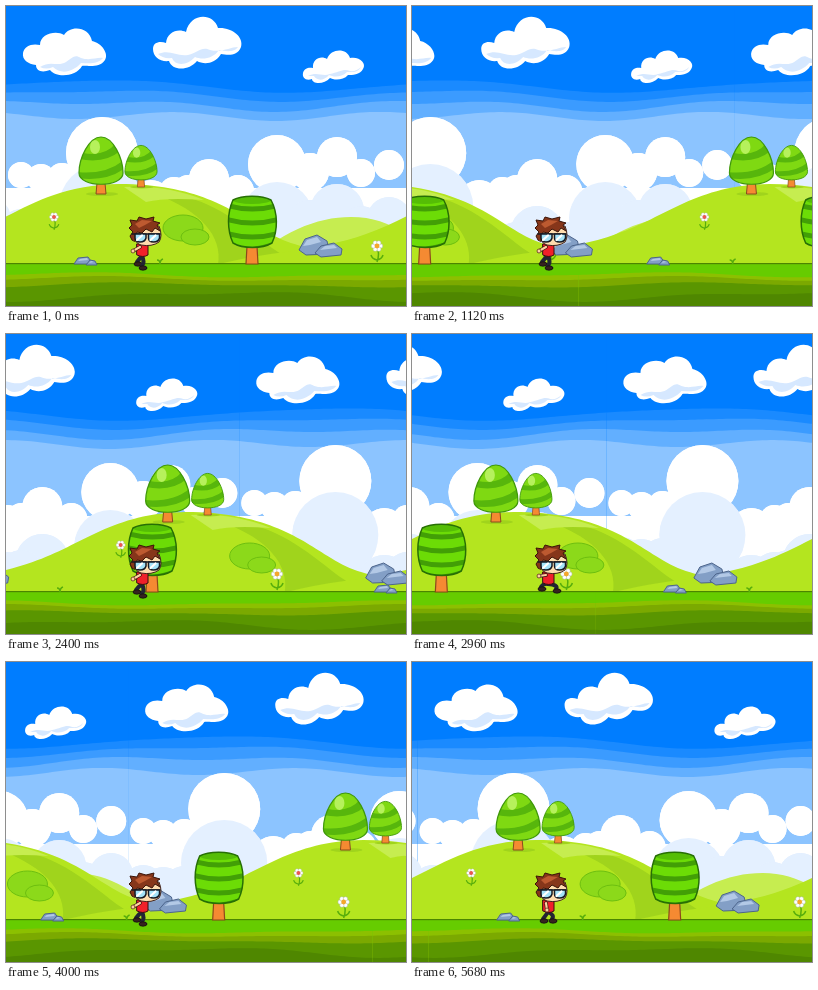
Recreate the animation shown at these times as an HTML page with a canvas. Size 400 by 300 pixels, loop 5.76 s.

```html
<!DOCTYPE html>
<html lang="en">
<head>
<meta charset="utf-8">
<title>Running through the hills</title>
<style>
html, body { margin: 0; width: 100%; height: 100%; overflow: hidden; }
canvas { display: block; width: 400px; height: 300px; }
</style>
</head>
<body>
<canvas id="stage" width="400" height="300"></canvas>
<script>
const ctx = document.getElementById('stage').getContext('2d');
const W = 400, STEP = 80, STEPS = 72;

function paint(path, fill, stroke, width = 1) {
  if (fill) { ctx.fillStyle = fill; ctx.fill(path); }
  if (stroke) { ctx.strokeStyle = stroke; ctx.lineWidth = width; ctx.stroke(path); }
}
const shape = (d, ...style) => paint(new Path2D(d), ...style);

function oval(x, y, rx, ry, ...style) {
  const path = new Path2D();
  path.ellipse(x, y, rx, ry, 0, 0, 7);
  paint(path, ...style);
}

function at(x, y, scale, draw) {
  ctx.save();
  ctx.translate(x, y);
  ctx.scale(scale, scale);
  draw();
  ctx.restore();
}

// Fills a path, then draws details that stay inside it.
function filled(path, fill, details) {
  paint(path, fill);
  ctx.save();
  ctx.clip(path);
  details();
  ctx.restore();
}

// Repeats a 400 px wide strip that scrolls left `loops` times per cycle.
function strip(loops, frame, draw) {
  const shift = (frame * W * loops / STEPS) % W;
  for (let k = -1; k < 3; k++) at(k * W - shift, 0, 1, draw);
}

// Fills everything below a periodic wavy edge.
function wave(y, height, phase, fill, bottom, ripple = 0, turn = 0) {
  const path = new Path2D();
  for (let x = 0; x <= W + 4; x += 4) {
    const a = x / W * Math.PI * 2;
    path.lineTo(x, y - height * Math.cos(a - phase) + ripple * Math.cos(2 * a - turn));
  }
  path.lineTo(W + 4, bottom);
  path.lineTo(0, bottom);
  paint(path, fill);
}

// Sky

const CLOUDS = [
  ['M17 47C18 40 26 37 34 39C34 28 50 24 58 29C64 19 83 20 86 35C96 37 103 48 99 54C93 63 80 59 76 60C70 71 50 72 44 64C36 67 30 65 30 59C22 58 16 54 17 47Z',
    'M34 61C44 54 52 61 60 56C67 52 68 48 75 52C84 55 91 51 97 52C91 59 82 57 75 57C67 66 55 69 47 61Q40 64 34 61Z'],
  ['M147 43C147 36 154 35 160 37C161 26 172 22 180 26C184 7 207 6 212 22C226 21 238 31 235 41C231 51 221 49 215 48C209 58 198 59 191 55C183 65 166 65 163 55C154 56 147 51 147 43Z',
    'M152 48C164 43 171 51 182 49C192 47 195 40 204 44C216 47 224 41 232 41C228 47 219 45 213 44C207 53 196 54 189 51C181 60 169 60 166 52Q157 53 152 48Z'],
  ['M297 67C298 62 303 61 307 62C306 53 315 49 321 53C325 42 341 42 344 52C353 50 361 57 357 63C354 69 346 69 342 69C337 75 327 74 324 72C318 79 306 78 306 73C300 75 296 72 297 67Z',
    'M302 70C311 65 316 71 324 68C333 66 338 62 344 65Q350 66 355 61C352 67 345 66 341 66C335 72 327 71 323 69C317 76 310 74 308 70Z']
];

// x, top, radius
const PUFFS = [[15, 156, 13], [35, 158, 14], [56, 157, 15], [96, 111, 36], [145, 174, 20],
  [168, 171, 15], [203, 153, 20], [182, 169, 14], [232, 169, 16], [271, 129, 29],
  [304, 147, 19], [331, 131, 20], [355, 153, 14], [383, 144, 15]];

function cumulus(drop, grow, fill) {
  for (const [x, top, r] of PUFFS)
    for (const dx of [-W, 0, W]) oval(x + dx, top + r + drop, r + grow, r + grow, fill);
  ctx.fillRect(0, 182 + drop, W + 4, 78 - drop);
}

function sky() {
  ctx.fillStyle = '#007dff';
  ctx.fillRect(0, 0, W + 4, 260);
  wave(80, 6, 1.4, '#1a8aff', 260, 1, 2);
  wave(89, 5, 1.3, '#3b9bff', 260, 2, 2.2);
  wave(99, 4, 1, '#62afff', 260, 3, 2.2);
  wave(110, 1, 1, '#8cc4ff', 260, 4, 2.2);
  for (const [body, shade] of CLOUDS) {
    shape(body, '#fff');
    shape(shade, '#d6e8ff');
  }
  cumulus(0, 0, '#fff');
  cumulus(54, 7, '#e4f0ff');
}

// Hills

const LEAF = '#7fd912', LEAF_DARK = '#57b60c', LEAF_LIGHT = '#b6f15c';
const GRASS = '#b4e51f', GRASS_DARK = '#a0d41c', GRASS_LIGHT = '#c6ed50';

function farHills() {
  shape('M235 262C275 226 310 211 345 211C385 211 405 232 455 262Z', GRASS_LIGHT);
}

function eggTree() {
  oval(1, 11, 16, 2, GRASS_DARK);
  shape('M-4 0H4L5 11H-5Z', '#f58a32', '#8a4a1d');
  const crown = new Path2D('M0 -46C12 -46 22 -25 22 -10C22 5 -22 5 -22 -10C-22 -25 -12 -46 0 -46Z');
  filled(crown, LEAF, () => {
    shape('M-18 -30Q4 -26 15 -40L19 -32Q4 -19 -22 -24Z', LEAF_DARK);
    shape('M-24 -11Q6 -8 24 -24V-15Q6 -1 -24 -5Z', LEAF_DARK);
    oval(-6, -36, 5, 7, LEAF_LIGHT);
  });
  paint(crown, null, '#3f980a', 1.2);
}

function flower(heart) {
  shape('M0 0Q3 8 0 16M0 14Q-5 13 -6 9M0 14Q5 13 6 9', null, '#57ad0c', 1.5);
  for (let i = 0; i < 6; i++) {
    const a = i * Math.PI / 3;
    oval(3.6 * Math.cos(a), 3.6 * Math.sin(a), 2.2, 2.2, '#fff', '#a9b9a0', .5);
  }
  oval(0, 0, 2.4, 2.4, heart);
}

function rock(d, highlight) {
  shape(d, '#839fc6', '#4d658c');
  shape(highlight, '#b3c9e6');
}

function hills() {
  shape('M-190 259C-140 245 -90 246 -40 228C10 211 40 179 113 178C190 178 225 203 255 222C275 235 290 241 330 246V259Z', GRASS);
  shape('M152 189C194 185 231 214 266 242L292 259H212C217 230 194 205 152 189Z', GRASS_DARK);
  shape('M118 181Q162 179 198 194Q160 191 140 196Z', GRASS_LIGHT);
  at(95, 177, 1, eggTree);
  at(135, 173, .73, eggTree);
  oval(177, 222, 20, 13, '#8cd91a', '#6dbf10');
  oval(189, 231, 14, 8, '#8cd91a', '#6dbf10');
  at(48, 211, .8, () => flower('#ea5750'));
}

function rocks() {
  rock('M293 244L299 233L311 229L321 235L324 248L300 249Z', 'M297 240L301 234L311 231L315 236L304 239Z');
  rock('M309 247L315 240L328 237L336 243L335 249L315 251Z', 'M314 244L319 240L328 239L331 242Z');
}

// Foreground

function barrelTree() {
  shape('M241 240H251L252 258H240Z', '#f58a32', '#8c491a', 1.2);
  const crown = new Path2D('M227 194C236 189 256 189 265 194C272 207 272 224 266 237C256 243 237 243 227 237C221 224 221 207 227 194Z');
  filled(crown, '#6cdc06', () => {
    oval(246, 194, 19, 4, '#55bd06');
    for (const y of [196, 210, 224])
      shape(`M218 ${y}Q246 ${y + 9} 275 ${y}V${y + 5}Q246 ${y + 14} 218 ${y + 5}Z`, '#429f06');
    shape('M222 238Q246 245 272 234V245H222Z', '#429f06');
  });
  paint(crown, null, '#276f05', 1.5);
}

function ground() {
  ctx.fillStyle = '#66cc00';
  ctx.fillRect(0, 258, W + 4, 42);
  wave(269, 2, 1, '#8cc000', 301, 1);
  wave(273, 2, 1.4, '#7ba900', 301, 1);
  wave(279, 2, 2.2, '#5a9600', 301, 1);
  wave(290, 4, 3.4, '#4f8700', 301, 2);
  ctx.fillStyle = '#4b8500';
  ctx.fillRect(0, 257, W + 4, 1.2);
}

function meadow() {
  barrelTree();
  at(371, 240, 1, () => flower('#f4a72b'));
  shape('M151 254Q154 254 154 258Q154 254 157 253', null, '#57ad0c', 1.5);
  rock('M68 258L72 252L82 251L87 258Z', 'M72 255L74 253L81 252L82 254Z');
  rock('M80 259L84 254L89 255L91 259Z', 'M83 257L85 255L88 256Z');
}

// Runner: back foot, front foot and hand for each pose

const POSES = [
  { back: [131, 258], front: [136, 262], hand: [127, 245] },
  { back: [129, 255], front: [144, 257], hand: [127, 242] },
  { back: [130, 258], front: [136, 262], hand: [127, 245] },
  { back: [131, 259], front: [140, 259], hand: [135, 248] }
];

function leg([x, y]) {
  shape(`M136 250Q${x + 3} ${y - 6} ${x} ${y - 2}`, null, '#222533', 4);
  oval(x + 1, y, 4, 2.2, '#35231f', '#15100f', .8);
}

function runner({ back, front, hand }) {
  ctx.lineCap = ctx.lineJoin = 'round';
  leg(back);
  leg(front);
  shape('M131 238H142L142 249Q137 252 131 249Z', '#f0202a', '#35100f');
  shape(`M134 241L${hand[0]} ${hand[1]}`, null, '#35100f', 3.6);
  shape(`M134 241L${hand[0]} ${hand[1]}`, null, '#ffd2a0', 2.2);
  oval(...hand, 2, 2, '#ffd2a0', '#5a2b17', .7);
  shape('M127 224L153 220Q157 230 153 236Q146 241 135 239Q127 237 127 224Z', '#ffdcae', '#40211a');
  shape('M126 234L124 230L127 226L123 222L126 219L124 214L131 215L133 211L140 213L148 211L147 215L154 217L151 219L154 225L149 222L146 226L140 223L136 227L131 226L129 235Z',
    '#86361a', '#3a1408');
  shape('M129 218L136 214L146 215L139 219L133 222Z', '#bd5a30');
  shape('M126 228H154', null, '#161a24', 1.6);
  for (const x of [129, 142.5]) {
    shape(`M${x} 228H${x + 11}V232Q${x + 10} 236 ${x + 5} 236Q${x} 236 ${x} 232Z`, '#a4e2f8', '#161a24', 1.5);
    shape(`M${x + 2} 234L${x + 7} 229.5`, null, '#fff', 2.2);
  }
  ctx.lineCap = 'butt';
  ctx.lineJoin = 'miter';
}

function render(now) {
  const frame = Math.floor(now / STEP) % STEPS;
  strip(1, frame, sky);
  strip(1, frame, farHills);
  strip(2, frame, hills);
  strip(2, frame, rocks);
  strip(3, frame, ground);
  strip(3, frame, meadow);
  runner(POSES[frame % POSES.length]);
}

const start = performance.now();
function tick() {
  render(performance.now() - start);
  requestAnimationFrame(tick);
}
tick();
</script>
</body>
</html>
```
